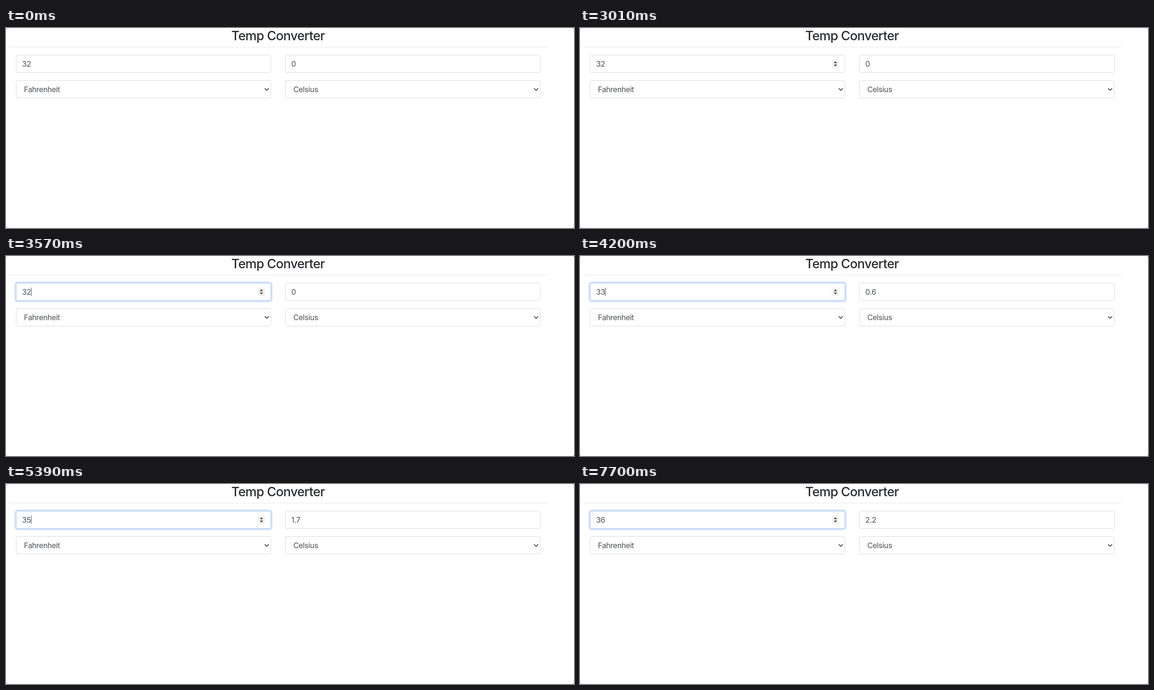
Recreate the animation shown at these times as an HTML page. Size 1202 by 424 pixels, loop 8000 ms.

```html
<!DOCTYPE html>
<html lang="en">
<head>
<meta charset="utf-8">
<title>Temp Converter</title>
<style>
html, body { margin: 0; width: 100%; height: 100%; overflow: hidden; background: #fff; }
svg { display: block; width: 1202px; height: 424px; }
text { font: 400 16px Inter, Roboto, sans-serif; font-optical-sizing: none; letter-spacing: -.38px; fill: #4c5055; }
.num { letter-spacing: -.3px; }
.title { font-size: 27px; font-weight: 500; letter-spacing: -.74px; fill: #2a2c2f; }
.box { fill: #fff; stroke: #dadbdd; }
.chevron { fill: none; stroke: #414141; stroke-width: 1.7; stroke-linecap: round; stroke-linejoin: round; }
</style>
</head>
<body>
<svg viewBox="0 0 1202 424">
  <path d="M0 0h3Q0 0 0 3zM1202 0v3Q1202 0 1199 0zM0 424v-3Q0 424 3 424zM1202 424h-3Q1202 424 1202 421z" fill="#777"/>
  <text class="title" x="476.7" y="26">Temp Converter</text>
  <rect x="6" y="40" width="1140" height="1" fill="#e9e9e9"/>

  <rect id="ring" fill="#d5e4fa"/>
  <rect id="input" class="box" x="21.5" y="57.5" width="539" height="37" rx="3.5"/>
  <rect class="box" x="591.5" y="57.5" width="539" height="37" rx="3.5"/>
  <rect class="box" x="21.5" y="111.5" width="539" height="37" rx="3.5"/>
  <rect class="box" x="591.5" y="111.5" width="539" height="37" rx="3.5"/>

  <text id="fahr" class="num" x="34" y="82">32</text>
  <text id="cels" class="num" x="603.8" y="82">0</text>
  <text x="38" y="136">Fahrenheit</text>
  <text x="608" y="136">Celsius</text>
  <path class="chevron" d="M548 128.3l3.8 3.8 3.8-3.8M1118 128.3l3.8 3.8 3.8-3.8"/>

  <g id="spinner">
    <rect x="533" y="67" width="15" height="18" rx="2" fill="#f3f3f3"/>
    <path d="M537 74.5l3.5-4 3.5 4zM537 77.5l3.5 4 3.5-4z" fill="#444"/>
  </g>
  <rect id="caret" x="53" y="67" width="1" height="18" fill="#4c5055"/>
</svg>
<script>
const LOOP = 8000, FOCUS = 3430, TICK = 70;
const steps = [4200, 4900, 5390, 6160];
const blinks = [FOCUS, 3990, 4200, 4690, 4900, 5950, 6160, 6650, 7210, 7700];
const [ring, input, fahr, cels, spinner, caret] =
  ["ring", "input", "fahr", "cels", "spinner", "caret"].map(id => document.getElementById(id));

const passed = (times, t) => times.filter(at => t >= at).length;
const show = (el, on) => el.setAttribute("visibility", on ? "visible" : "hidden");
const mix = (a, b, k) => `rgb(${a.map((v, i) => Math.round(v + (b[i] - v) * k))})`;
const set = (el, attrs) => Object.entries(attrs).forEach(([k, v]) => el.setAttribute(k, v));

// the ring spreads out from the field edge while it fades in
function drawFocus(k) {
  const s = 3 * k;
  set(ring, { x: 21 - s, y: 57 - s, width: 540 + 2 * s, height: 38 + 2 * s, rx: 4 + s, opacity: k });
  input.style.stroke = mix([218, 219, 221], [166, 198, 240], k);
}

function draw(t) {
  const deg = 32 + passed(steps, t);
  fahr.textContent = deg;
  cels.textContent = Math.round((deg - 32) * 50 / 9) / 10;

  const ticks = Math.floor((t - FOCUS) / TICK);
  drawFocus(ticks < 1 ? 0 : ticks < 2 ? .4 : 1);

  show(spinner, t >= 3010);
  show(caret, passed(blinks, t) % 2);
  set(caret, { x: deg === 36 ? 54 : 53 });
}

const start = performance.now();
function tick() {
  draw((performance.now() - start) % LOOP);
  requestAnimationFrame(tick);
}
draw(0);
requestAnimationFrame(tick);
</script>
</body>
</html>
```
